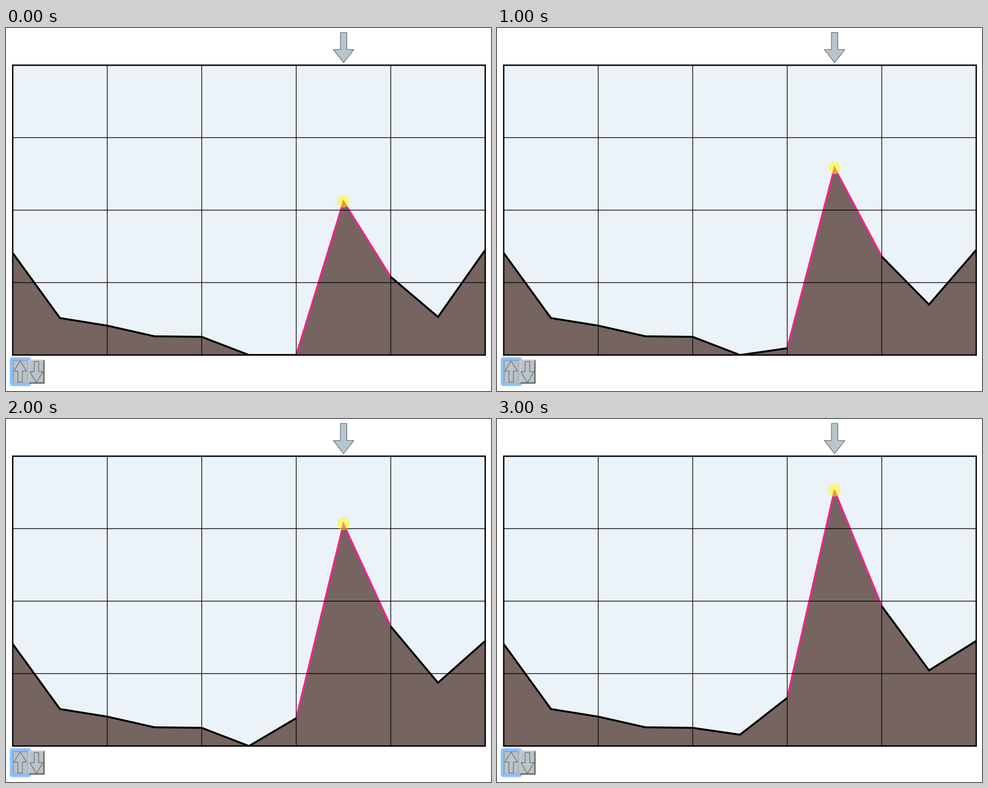
These frames come from a looping animation (866x647 px, 3500 ms). A matplotlib script:

```python
import numpy as np
import matplotlib.pyplot as plt
from matplotlib.animation import FuncAnimation
from matplotlib.patches import Circle, FancyBboxPatch, Polygon, Rectangle

W, H, DPI = 866, 647, 64
PX = 72 / DPI  # one pixel in points

LEFT, RIGHT, TOP, FLOOR = 12, 855.7, 66.3, 582.9
SKY, ROCK, PINK, STEEL = "#ebf2f8", "#756460", "#f5228c", "#b8c5cc"
PEAK = 7  # index of the raised point

PEAK_Y = [309, 274.8, 249.2, 213, 187, 160.8, 127.2]
BASE_Y = np.array([401, 517, 530.5, 549.5, 550.5,
                   619, 607, 309, 443.5, 515, 395.5])
# share of the lift passed on to the neighbours
PULL = np.array([0, 0, 0, 0, 0, 0.31, 0.605, 1, 0.605, 0.368, 0])
PULL[5] = PULL[9]
BASE_Y[5] = 562.7 + PULL[5] * (PEAK_Y[0] - PEAK_Y[-1])
XS = np.linspace(LEFT, RIGHT, len(BASE_Y))

plt.rcParams["path.snap"] = False
fig = plt.figure(figsize=(W / DPI, H / DPI), dpi=DPI, facecolor="white")
ax = fig.add_axes([0, 0, 1, 1])
ax.set(xlim=(0, W), ylim=(H, 0))
ax.axis("off")


def box(x0, y0, x1, y1, color, z):
    return ax.add_patch(Rectangle((x0, y0), x1 - x0, y1 - y0,
                                  fc=color, ec="none", zorder=z))


def arrow(cx, tail, neck, tip, shaft, head, z=10):
    """Block arrow with half widths shaft and head."""
    pts = [(cx - shaft, tail), (cx + shaft, tail), (cx + shaft, neck),
           (cx + head, neck), (cx, tip), (cx - head, neck), (cx - shaft, neck)]
    ax.add_patch(Polygon(pts, fc=STEEL, ec="#5d676c", lw=1.1 * PX, zorder=z))


def button(x0, x1, light, dark, z):
    y0, y1, b = 591, 634, 2.5
    box(x0, y0, x1, y1, "#c0c0c0", z)
    for color, (cx, cy), (dx, dy) in ((light, (x0, y0), (b, b)),
                                      (dark, (x1, y1), (-b, -b))):
        ox, oy = x0 + x1 - cx, y0 + y1 - cy
        pts = [(cx, cy), (ox, cy), (ox - dx, cy + dy),
               (cx + dx, cy + dy), (cx + dx, oy - dy), (cx, oy)]
        ax.add_patch(Polygon(pts, fc=color, ec="none", zorder=z + 0.1))


def focus_ring(x0, y0, x1, y1):
    for width, alpha in ((8, 0.2), (6.5, 0.4), (5, 0.8)):
        ax.add_patch(FancyBboxPatch(
            (x0, y0), x1 - x0, y1 - y0,
            boxstyle="round,pad=0,rounding_size=2", fc="none",
            ec="#83bbfb", lw=width * PX, alpha=alpha, zorder=8.5))


def stroke(color, width, z, **kw):
    line, = ax.plot([], [], color=color, lw=width * PX, zorder=z,
                    solid_capstyle="butt", solid_joinstyle="miter", **kw)
    return line


# chart
frame = box(LEFT, TOP, RIGHT, FLOOR, SKY, 0)
for x in np.linspace(LEFT, RIGHT, 6)[1:-1]:
    stroke("black", 1.25, 5).set_data([x, x], [TOP, FLOOR])
for y in np.linspace(TOP, FLOOR, 5)[1:-1]:
    stroke("black", 1.25, 5).set_data([LEFT, RIGHT], [y, y])
ax.add_patch(Rectangle((LEFT, TOP), RIGHT - LEFT, FLOOR - TOP, fc="none",
                       ec="black", lw=2.4 * PX, joinstyle="miter", zorder=6))

# controls
arrow(602.8, 8, 38.3, 61.8, 5.7, 18.4)
button(11, 40, "#858585", "#b4b4b4", 8)
focus_ring(9.8, 589.8, 41.7, 635.2)
button(40, 69, "#cacaca", "#696969", 9)
arrow(25.3, 631, 611.5, 593.5, 4, 11.3)
arrow(54.3, 594.5, 612.5, 632, 4, 11.7)

# terrain
rock = ax.add_patch(Polygon([(0, 0)] * 3, fc=ROCK, ec="none", zorder=1))
ridges = [(stroke("black", 3.4, 2), slice(0, PEAK)),
          (stroke("black", 3.4, 2), slice(PEAK + 1, None)),
          (stroke(PINK, 3.2, 3), slice(PEAK - 1, PEAK + 2))]
handle = ax.add_patch(Circle((XS[PEAK], 0), 11, fc="#ffff00", ec="none",
                             alpha=0.5, zorder=7))
for art in (rock, *(line for line, _ in ridges)):
    art.set_clip_path(frame)


def draw(i):
    ys = np.minimum(BASE_Y - PULL * (PEAK_Y[0] - PEAK_Y[i]), FLOOR)
    rock.set_xy([*zip(XS, ys), (RIGHT, FLOOR), (LEFT, FLOOR)])
    for line, part in ridges:
        line.set_data(XS[part], ys[part])
    handle.center = XS[PEAK], ys[PEAK]
    return [rock, handle] + [line for line, _ in ridges]


anim = FuncAnimation(fig, draw, frames=len(PEAK_Y), interval=500, repeat=True)
plt.show()
```
